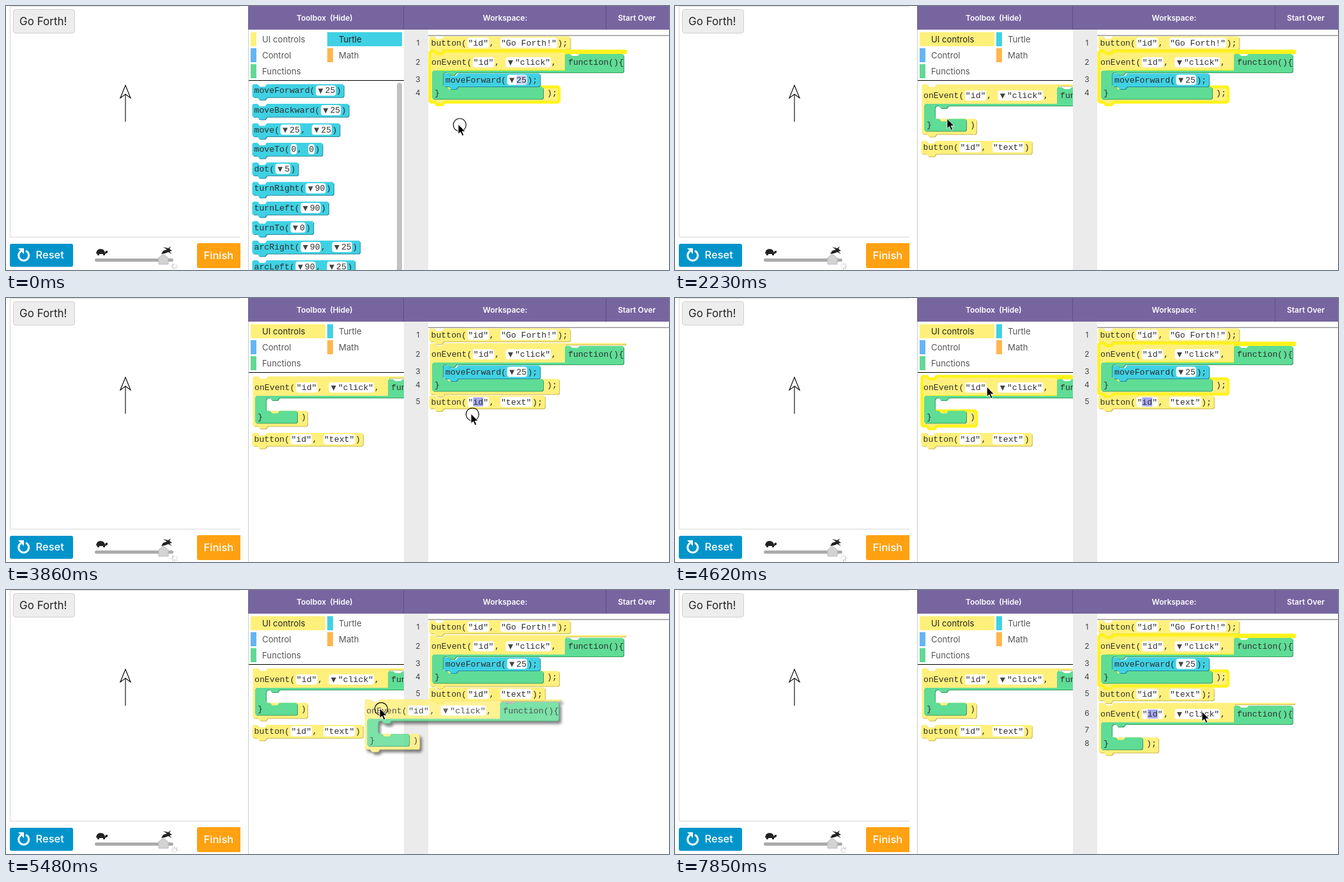
An HTML page for the animation above (8000 ms loop, 1038x413 px).

```html
<!DOCTYPE html>
<html lang="en">
<head>
<meta charset="utf-8">
<title>Block coding demo</title>
<style>
html, body { margin: 0; width: 100%; height: 100%; overflow: hidden; background: #fff; }
svg { display: block; width: 100%; height: 100%; }
text { font-family: Inter, sans-serif; white-space: pre; }
.code { font: 13.2px "Liberation Mono", monospace; fill: #2e2e2e; }
.drag { opacity: .82; filter: drop-shadow(3px 4px 2px rgba(0,0,0,.6)); }
</style>
</head>
<body>
<svg id="stage" viewBox="0 0 1038 413"></svg>
<script>
const LOOP = 8000, CH = 7.92;
const YELLOW = ['#fff07c', '#c9b855'], GREEN = ['#5fdc95', '#3a9d66'], CYAN = ['#3fd1e3', '#27889a'];
const stage = document.getElementById('stage');

const label = (x, y, s, size, fill, extra = '') =>
  `<text x="${x}" y="${y}" font-size="${size}" fill="${fill}" ${extra}>${s}</text>`;
const code = (x, y, s) => `<text class="code" x="${x}" y="${y + 4}">${s}</text>`;
const box = (x, y, w, h, fill, extra = '') =>
  `<rect x="${x}" y="${y}" width="${w}" height="${h}" fill="${fill}" ${extra}/>`;
const group = (id, body, extra = '') => `<g id="${id}" ${extra}>${body}</g>`;
const bevel = (d, [fill, dark], extra = '') =>
  `<path d="${d}" fill="${dark}" transform="translate(1 1)"/><path d="${d}" fill="${fill}" ${extra}/>`;

// Code text; [..] is an editable socket, a leading v adds its dropdown arrow.
function row(x, y, src, selId) {
  let svg = '';
  src.split(/[\[\]]/).forEach((s, i) => {
    if (i % 2 === 0) {
      svg += code(x, y, s);
      x += s.length * CH;
      return;
    }
    const menu = s[0] === 'v';
    if (menu) s = s.slice(1);
    const pad = menu ? 16 : 2.5, len = s.length * CH;
    svg += box(x + 1.5, y - 8, pad + len - 0.5, 16, '#fff', 'rx="4"');
    if (menu) svg += `<path d="M${x + 5} ${y - 3}h8l-4 8z" fill="#444"/>`;
    if (selId) {
      const q = s[0] === '"' ? 1 : 0;
      svg += box(x + pad + q * CH, y - 7, len - 2 * q * CH, 14, q ? '#a6a7f6' : '#cdd3f6', `id="${selId}"`);
      selId = '';
    }
    svg += code(x + pad, y, s);
    x += pad + len + 1.5;
  });
  return { svg, end: x };
}

function block(x, y, src, color, selId) {
  const r = row(x, y, src, selId), l = x - 3, t = y - 10, b = y + 10.5, e = r.end + 4;
  const d = `M${l + 2} ${t}H${l + 8}l3 4h9l3 -4H${e - 2}l2 2V${b - 2}l-2 2H${l + 23}l-3 4h-9l-3 -4H${l + 2}l-2 -2V${t + 2}z`;
  return bevel(d, color) + r.svg;
}

// Event handler block: yellow frame around a green function body.
function eventBlock(x, y, { gap = 20, bar = 66, tail = ');', hl, sel }) {
  const top = y - 17.5, inner = y + 16.5 + gap, foot = inner + 19, low = foot + 5;
  const edge = x + bar, right = edge + (tail.length > 1 ? 25 : 16), l = x - 2.5;
  const frame = `M${l + 2} ${top}H${l + 8}l3 4h9l3 -4H${x + 304}v2.5H${x + 211}V${y + 14}H${x + 10}V${inner}H${right - 2}l2 2V${low - 2}l-2 2H${l + 23}l-3 4h-9l-3 -4H${l + 2}l-2 -2V${top + 2}z`;
  const body = `M${x + 211} ${y - 13}h6l3 3h9l3 -3H${x + 299}l2 2V${y + 14}l-2 2H${x + 39}l-3 4h-9l-3 -4H${x + 20}l-2 3V${inner - 2}l2 2h4l3 4h9l3 -4H${edge - 2}l2 2V${foot - 2}l-2 2H${x + 3}l-2 -2V${y + 16}l2 -3H${x + 209}V${y - 11}z`;
  return bevel(frame, YELLOW) +
    (hl ? `<path id="${hl}" d="${frame}" fill="none" stroke="#fff31c" stroke-width="4.5" stroke-linejoin="round"/>` : '') +
    bevel(body, GREEN) +
    row(x, y, 'onEvent(["id"], [v"click"],', sel).svg +
    code(x + 214, y, 'function(){') + code(x + 5, inner + 9.5, '}') + code(edge + 6, inner + 9.5, tail);
}

const dropMark = (id, x2, y) => group(id,
  `<path d="M662 ${y}H${x2}v8H684l-3 4h-9l-3 -4H662z" fill="#fffb00"/>`);

function leftPanel() {
  return `<path d="M367 .5H6.5V361.5H367" fill="none" stroke="#d8d8d8"/>` +
    box(11.5, 5.5, 96, 37, '#ededed', 'rx="4" stroke="#cfcfcf"') +
    label(21, 30, 'Go Forth!', 17, '#222') +
    `<path d="M187 181V138L179 144L187 124L195 144L187 138" fill="none" stroke="#000" stroke-width="1.1"/>` +
    box(6, 372, 99, 36, '#0094ca', 'rx="3"') +
    `<path d="M23.5 383.5A8 8 0 1 0 31 383" fill="none" stroke="#fff" stroke-width="3"/><path d="M19 379h9v9z" fill="#fff"/>` +
    label(46.5, 395, 'Reset', 16.5, '#fff', 'font-weight="500"') +
    `<path d="M367 371H302q-3 0 -3 3V407q0 3 3 3H367z" fill="#ffa111"/>` +
    label(309.5, 396, 'Finish', 16.5, '#fff', 'font-weight="500"') +
    `<path d="M141 387q1 -7 7 -7t7 6l1 -3h3v3l-4 2v2h-3v-2h-6v2h-3v-2z" fill="#222"/>` +
    `<path d="M243 388l3 -5 6 -2 -6 -4 8 2 4 -3 -2 4 4 3 -4 1 4 4 -6 -3 -5 2z" fill="#222"/>` +
    box(139, 395, 123, 5, '#ababab', 'rx="2.5"') +
    `<path d="M239 404V394l7 -6 8 6V404z" fill="#d3d3d3" stroke="#bbb"/>`;
}

function category(x, y, name, color) {
  return box(x, y - 11, 9, 22, color) + label(x + 18, y + 4.5, name, 13.2, '#555');
}
const activeCategory = (x, name, color) => box(x, 41, 117, 22, color) + label(x + 18, 56.5, name, 13.2, '#222');

function chrome() {
  const head = (x, s) => label(x, 23, s, 12, '#fff', 'font-weight="600"');
  return box(379, 0, 1, 413, '#ccc') + box(623, 37, 38, 376, '#ebebeb') +
    box(661, 45.5, 377, 1.5, '#999') +
    box(379, 0, 659, 37, '#7765a0') + box(622, 0, 1, 37, '#5d4f80') + box(939, 0, 1, 37, '#5d4f80') +
    head(455, 'Toolbox  (Hide)') + head(746.5, 'Workspace:') + head(958, 'Start Over') +
    category(383, 52, 'UI controls', '#fff07c') + category(503, 52, 'Turtle', '#3fd1e3') +
    category(383, 77, 'Control', '#64b5f6') + category(503, 77, 'Math', '#ffb74d') +
    category(383, 102, 'Functions', '#62d893') + box(380, 116, 243, 1, '#000');
}

function turtleBox() {
  const list = ['moveForward([v25])', 'moveBackward([v25])', 'move([v25], [v25])', 'moveTo([0], [0])', 'dot([v5])',
    'turnRight([v90])', 'turnLeft([v90])', 'turnTo([v0])', 'arcRight([v90], [v25])', 'arcLeft([v90], [v25])'];
  return activeCategory(503, 'Turtle', '#3fd1e3') +
    list.map((s, i) => block(388.5, 132.3 + 30.6 * i, s, CYAN)).join('') +
    box(612, 120, 8, 300, '#c2c2c2', 'rx="4"');
}

const uiBox = () => activeCategory(383, 'UI controls', '#fff07c') +
  eventBlock(389, 140, { bar: 67, tail: ')', hl: 'hoverEvent' }) +
  block(388.5, 221, 'button(["id"], ["text"])', YELLOW);

const num = (n, y) => label(645, y + 4, n, 12, '#444', 'text-anchor="middle"');

function workspace() {
  return num(1, 57.5) + num(2, 88) + num(3, 115) + num(4, 136) +
    block(665.5, 57.5, 'button(["id"], ["Go Forth!"]);', YELLOW) +
    eventBlock(666, 88, { gap: 22, bar: 175, hl: 'hoverWork' }) +
    block(688, 115.5, 'moveForward([v25]);', CYAN, 'selNum') +
    group('newEvent', num(6, 193) + num(7, 219) + num(8, 240) + eventBlock(666, 194, { sel: 'selEvent' })) +
    group('newButton', num(5, 162) + block(665.5, 162.5, 'button(["id"], ["text"]);', YELLOW, 'selButton')) +
    dropMark('mark1', 868, 149) + dropMark('mark2', 843, 169);
}

const tooltip = () => box(634, 119, 412, 84, '#0094ca', 'rx="8"') +
  `<text x="641" y="140" fill="#fff" style="font:bold 13.7px 'Liberation Mono',monospace">onEvent(id, type, callback: function)</text>` +
  label(641, 158, 'Executes the callback function code when a specific event type occurs', 10.8, '#fff', 'font-weight="500"') +
  label(1030, 192, 'See examples', 11, '#fff', 'font-weight="700" text-anchor="end" text-decoration="underline"');

const petals = Array.from({ length: 8 }, (_, i) =>
  `<path d="M0 -2.2V-5.5" stroke="#bbb" stroke-width="1.6" opacity="${0.2 + i / 10}" transform="rotate(${i * 45})"/>`).join('');

stage.innerHTML = `<defs><clipPath id="tools">${box(380, 37, 243, 376, '#000')}</clipPath></defs>` +
  leftPanel() + group('spinner', petals) + chrome() + workspace() +
  group('turtleBox', turtleBox(), 'clip-path="url(#tools)"') +
  group('uiBox', uiBox(), 'clip-path="url(#tools)"') +
  group('tip', tooltip()) +
  group('drag1', block(388.5, 221, 'button(["id"], ["text"])', YELLOW), 'class="drag"') +
  group('drag2', eventBlock(389, 140, { bar: 67, tail: ')' }), 'class="drag"') +
  group('cursor', `<circle id="ring" cx="2.3" cy="1" r="10" fill="none" stroke="#111" stroke-width="1.2"/>` +
    `<path d="M0 0V15.5l3.6 -3.3 2.7 6 2.6 -1.2 -2.7 -5.7h4.9z" fill="#000" stroke="#fff" stroke-width=".9"/>`);

const el = {};
stage.querySelectorAll('[id]').forEach(n => el[n.id] = n);

// Pointer route: time, x, y
const ROUTE = [[0, 708, 185], [60, 708, 185], [840, 449, 50], [950, 449, 50], [1710, 441, 50], [1770, 441, 50],
  [2230, 426, 176], [2520, 417.5, 224.5], [2700, 417.5, 224.5], [3280, 718, 215], [3450, 747, 210],
  [3680, 728, 181], [4340, 728, 181], [4620, 489, 139], [4800, 401, 136], [5060, 401, 136], [5128, 443, 170],
  [5150, 458, 177], [5900, 687, 190], [6790, 687, 190], [7610, 825, 190], [LOOP, 825, 190]];

// Slope at a stop; zero wherever the pointer rests.
function slope(i, k) {
  const a = ROUTE[i - 1], b = ROUTE[i], c = ROUTE[i + 1];
  if (!a || !c) return 0;
  const still = (p, q) => p[1] === q[1] && p[2] === q[2];
  return still(a, b) || still(b, c) ? 0 : (c[k] - a[k]) / (c[0] - a[0]);
}

function pointer(t) {
  let i = 0;
  while (i < ROUTE.length - 2 && t >= ROUTE[i + 1][0]) i++;
  const a = ROUTE[i], b = ROUTE[i + 1], h = b[0] - a[0], u = (t - a[0]) / h, v = 1 - u;
  return [1, 2].map(k => v * v * (1 + 2 * u) * a[k] + u * u * (3 - 2 * u) * b[k] +
    h * u * v * (v * slope(i, k) - u * slope(i + 1, k)));
}

const show = (id, on) => { el[id].style.display = on ? '' : 'none'; };
const move = (id, x, y) => el[id].setAttribute('transform', `translate(${x.toFixed(2)} ${y.toFixed(2)})`);
const clamp = v => Math.max(0, Math.min(1, v));

function draw(t) {
  const within = (a, b) => t >= a && t < b;
  const [x, y] = pointer(t), [bx, by] = pointer(Math.max(0, t - 22));
  move('cursor', x, y);
  show('ring', within(0, 60) || within(950, 1830) || within(2640, 4340) || within(5040, 6790));
  show('turtleBox', t < 1770);
  show('uiBox', t >= 1770);
  show('selNum', t < 1770);
  show('hoverWork', !within(2760, 3950) && !within(5250, 6380));
  show('hoverEvent', within(4560, 5250));
  el.hoverEvent.style.opacity = clamp((5250 - t) / 190);
  show('newButton', t >= 3860);
  show('selButton', within(3860, 5060));
  show('newEvent', t >= 6300);
  show('mark1', within(3100, 3860));
  show('mark2', within(5600, 6300));
  show('drag1', within(2700, 3860));
  show('drag2', within(5060, 6300));
  move('drag1', bx - 417.5, by - 224.5);
  move('drag2', bx - 401, by - 136);
  el.tip.style.opacity = clamp((t - 4750) / 120) * clamp((5161 - t) / 105);
  el.spinner.setAttribute('transform', `translate(264 407) rotate(${Math.floor(t / 60) * 45 % 360})`);
}

const start = performance.now();
function tick() {
  draw((performance.now() - start) % LOOP);
  requestAnimationFrame(tick);
}
tick();
</script>
</body>
</html>
```
